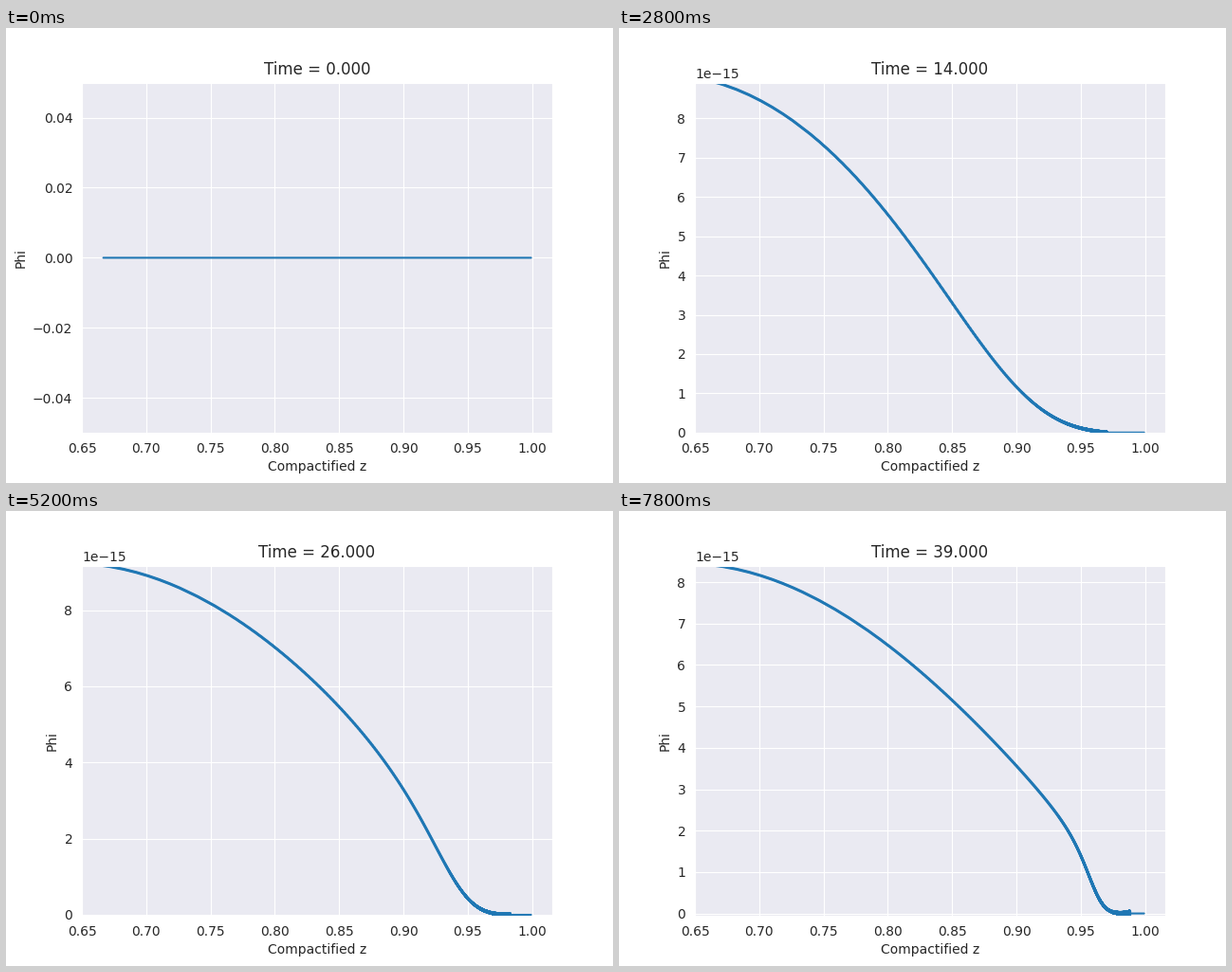
Animation of 640 by 480 pixels, one loop 7900 ms. Source, as a matplotlib script:

```python
import numpy as np
import matplotlib.pyplot as plt
from matplotlib.animation import FuncAnimation

FRAMES, INTERVAL, DT = 79, 100, 0.5
UNIT = 1e-15
BLUE = "#1f77b4"

plt.rcParams.update({
    "font.family": "DejaVu Sans", "font.size": 10,
    "axes.facecolor": "#EAEAF2", "axes.edgecolor": "white",
    "axes.labelcolor": ".15", "text.color": ".15",
    "axes.grid": True, "axes.axisbelow": True,
    "grid.color": "white", "grid.linewidth": 0.8, "grid.linestyle": "-",
    "xtick.color": ".15", "ytick.color": ".15",
    "xtick.bottom": False, "ytick.left": False,
    "lines.solid_capstyle": "round",
})

# Radius grid and its compactified coordinate
r = np.append(np.arange(2, 100, 0.05), 1250)
z = r / (1 + r)
sign = np.where(np.arange(len(r)) % 2, 1.0, -1.0)

# Height of the left end (in UNIT) at a few times
PEAK_T = np.array([0, 6, 10, 14, 21.5, 30, 39])
PEAK = np.array([0, 4.76, 7.46, 8.915, 9.415, 8.84, 8.40])
SLOPE = np.gradient(PEAK, PEAK_T, edge_order=2)


def peak(t):
    """Cubic Hermite curve through the peak heights."""
    k = min(np.searchsorted(PEAK_T, t, side="right"), len(PEAK_T) - 1) - 1
    h = PEAK_T[k + 1] - PEAK_T[k]
    u = (t - PEAK_T[k]) / h
    return ((1 + 2 * u) * (1 - u) ** 2 * PEAK[k]
            + u * (1 - u) ** 2 * h * SLOPE[k]
            + u * u * (3 - 2 * u) * PEAK[k + 1]
            + u * u * (u - 1) * h * SLOPE[k + 1])


def field(t):
    """Static sine arch, cut by a steepening shoulder that moves outward."""
    shoulder = 2.05 + t * (0.178 + 0.481 * t * t / (t * t + 523))
    steep = 2.35 + 4.3 / (1 + np.exp((28.5 - t) / 5))
    shape = np.sin(np.pi / 2 * (1 - z) / 0.36) / (1 + (r / shoulder) ** steep)
    q = np.minimum(r / (5 + 2 * t), 1)
    smooth = peak(t) * shape / shape[0] * (1 - q ** 6)
    # grid-scale ripple behind the front
    ripple = 0.02 * min(1, t / 6) * q * (1 - q * q)
    ripple += np.where(q < 1, 0.06 * (t / 39) ** 1.7 * q ** 3, 0)
    return (smooth + sign * ripple) * UNIT, q < 1


fig, ax = plt.subplots(figsize=(6.4, 4.8), dpi=100)
line, = ax.plot(z, np.zeros_like(z), color=BLUE, lw=1.5)
wave, = ax.plot([], [], color=BLUE, lw=2.2)
ax.set_xlim(0.65, 1.0157)
ax.set_xlabel("Compactified z")
ax.set_ylabel("Phi")


def update(i):
    t = i * DT
    if i:
        phi, behind = field(t)
        line.set_ydata(phi)
        wave.set_data(z[behind], phi[behind])
        ax.set_ylim(phi.min(), phi.max())
    else:
        line.set_ydata(np.zeros_like(z))
        wave.set_data([], [])
        ax.set_ylim(-0.05, 0.05)
    ax.set_title(f"Time = {t:.3f}")
    return line, wave


anim = FuncAnimation(fig, update, frames=FRAMES, interval=INTERVAL,
                     repeat=True, repeat_delay=0, blit=False)
plt.show()
```
